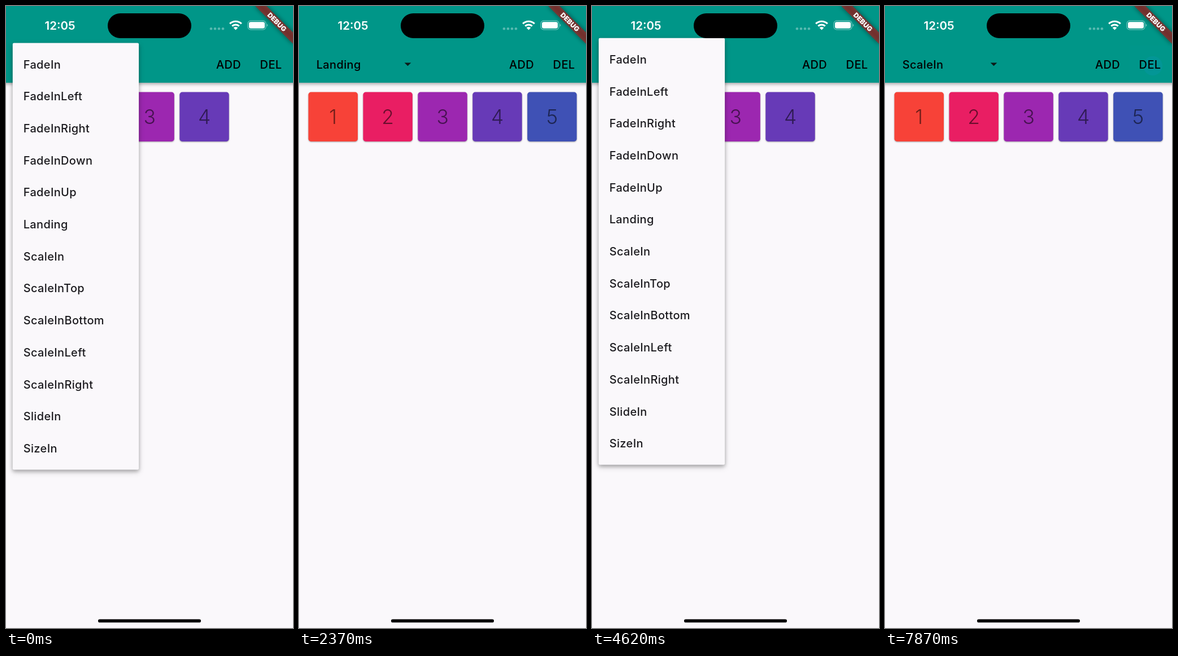
An HTML page for the animation above (8 s loop, 508x1102 px).

```html
<!DOCTYPE html>
<html lang="en">
<head>
<meta charset="utf-8">
<title>List effects</title>
<style>
  html, body { margin: 0; width: 100%; height: 100%; overflow: hidden; background: #faf8fb; }
  svg { display: block; width: 100vw; height: 100vh; }
  text { font-family: Inter, Roboto, sans-serif; }
  .label { font-size: 20px; font-weight: 500; letter-spacing: .35px; }
  .num { font-size: 35.4px; font-weight: 350; text-anchor: middle; fill: rgba(0,0,0,.54); }
  .bar { filter: drop-shadow(0 2px 3px rgba(0,0,0,.38)); }
  .card { filter: drop-shadow(0 1px 1.2px rgba(0,0,0,.35)); }
  .sheet { filter: drop-shadow(0 3px 3px rgba(0,0,0,.2)) drop-shadow(0 3px 5px rgba(0,0,0,.22)); }
  .blur { filter: blur(4px); }
</style>
</head>
<body>
<svg viewBox="0 0 508 1102" preserveAspectRatio="none">
  <defs>
    <clipPath id="slot"><rect x="-48.45" y="-48.45" width="96.9" height="96.9"/></clipPath>
    <clipPath id="picker"><rect x="30.7" y="74.5" width="176.5" height="56.7"/></clipPath>
    <clipPath id="add"><rect x="356.5" y="69.7" width="75.7" height="66.1"/></clipPath>
    <clipPath id="del"><rect x="432.3" y="69.7" width="75.7" height="66.1"/></clipPath>
  </defs>
  <rect width="508" height="1102" fill="#faf8fb"/>
  <g id="cards"></g>
  <rect class="bar" x="-20" y="-20" width="548" height="155.9" fill="#009688"/>
  <g id="ripples"></g>
  <text id="choice" class="label" x="30.7" y="111"></text>
  <path d="M186.6 100.4h11.8l-5.9 5.9z" fill="#0c1a18"/>
  <text class="label" x="372" y="111">ADD</text>
  <text class="label" x="449.6" y="111">DEL</text>
  <g id="menu"></g>

  <g fill="#fff">
    <text x="95.5" y="42.4" font-size="20.5" font-weight="600" text-anchor="middle">12:05</text>
    <g fill-opacity=".35">
      <circle cx="363" cy="40.2" r="2.3"/><circle cx="370" cy="40.2" r="2.3"/>
      <circle cx="377" cy="40.2" r="2.3"/><circle cx="384" cy="40.2" r="2.3"/>
    </g>
    <path d="M406.5 42.5l-3.9-4a5.7 5.7 0 0 1 7.8 0z"/>
    <g fill="none" stroke="#fff" stroke-width="3.1">
      <path d="M400.3 35.6a9 9 0 0 1 12.4 0"/>
      <path d="M396.2 31.4a14.8 14.8 0 0 1 20.6 0"/>
    </g>
    <rect x="428" y="26.2" width="32" height="15.6" rx="5" fill="none" stroke="#fff" stroke-opacity=".45" stroke-width="1.2"/>
    <rect x="430" y="28.2" width="28" height="11.6" rx="3.2"/>
    <path d="M461.8 31.4q3 2.6 0 5.2z" fill-opacity=".5"/>
  </g>
  <rect x="180" y="13" width="148" height="44" rx="22"/>
  <g transform="translate(508 0) rotate(45)">
    <rect class="blur" x="-47.3" y="33.1" width="94.6" height="14.2" fill-opacity=".5"/>
    <rect x="-47.3" y="33.1" width="94.6" height="14.2" fill="#b71c1c" fill-opacity=".627"/>
    <text y="44.5" font-size="12" font-weight="900" text-anchor="middle" fill="#fff">DEBUG</text>
  </g>
  <rect x="163" y="1086.6" width="182" height="5.6" rx="2.8"/>
</svg>
<script>
const LOOP = 8000, STEP = 125;
const ROW = 56.71, PAD = 9.45, SLOT = 96.9;
const colors = ['#f74238', '#e91e63', '#9c27b0', '#673ab7', '#3f51b5'];
const effects = ['FadeIn', 'FadeInLeft', 'FadeInRight', 'FadeInDown', 'FadeInUp', 'Landing',
  'ScaleIn', 'ScaleInTop', 'ScaleInBottom', 'ScaleInLeft', 'ScaleInRight', 'SlideIn', 'SizeIn'];

const $ = id => document.getElementById(id);
const unit = v => Math.max(0, Math.min(1, v));
const ramp = (t, from, span) => unit((t - from) / span);
const mix = (a, b, k) => a + (b - a) * k;

function card(slot, n, scale = 1, alpha = 1) {
  const x = 60.3 + SLOT * slot;
  return `<g transform="translate(${x} 196.3)" clip-path="${scale > 1 ? 'url(#slot)' : 'none'}">
    <g transform="scale(${scale})" opacity="${alpha}">
      <rect class="card" x="-43.7" y="-43.7" width="87.4" height="87.4" rx="4.7" fill="${colors[n - 1]}"/>
      <text class="num" y="13">${n}</text></g></g>`;
}

const row = list => list.map((n, i) => n ? card(i, n) : '').join('');
const landing = k => card(1, 2, mix(1.5, 1, k), k);

function cards(t) {
  if (t < 1625) return row([1, 2, 3, 4]);
  if (t < 2000) return row([1, 0, 3, 4, 5]) + landing(ramp(t, 1625, 300));
  if (t < 3000) return row([1, 2, 3, 4, 5]);
  if (t < 3286) return row([1, 0, 2, 3, 4]) + landing(1 - ramp(t, 2986, 300));
  if (t < 6625) return row([1, 2, 3, 4]);
  if (t < 7000) return row([1, 0, 3, 4, 5]) + card(1, 2, ramp(t, 6600, 300));
  return row([1, 2, 3, 4, 5]);
}

function press(t, start, span, id, x, y) {
  const age = t - start;
  if (age < 0 || age >= span) return '';
  const fade = ramp(span - age, 0, span * .6);
  return `<g clip-path="url(#${id})" fill="#2196f3" opacity="${fade}">
    <rect x="340" y="60" width="168" height="80" opacity="${.02 + .05 * ramp(age, 0, 125)}"/>
    <circle cx="${x}" cy="${y}" r="${17 + age * .26}" opacity=".11"/></g>`;
}

function pickerPress(t) {
  if (t < 4125 || t >= 4500) return '';
  return `<g clip-path="url(#picker)" fill="#c8c8c8">
    <rect x="30" y="74" width="178" height="58" opacity="${.09 * ramp(t, 4080, 170)}"/>
    <circle cx="75" cy="93" r="${(t - 4090) * .388}" opacity=".28"/></g>`;
}

// k is the opening progress, fade the opacity of the whole sheet
function menu(selected, top, k, fade) {
  const grow = ramp(k, .25, .25), part = .5 / (effects.length + 1.5);
  const from = top + PAD + selected * ROW, end = top + 2 * PAD + effects.length * ROW;
  const y = mix(selected ? from - PAD + 9.3 : top, top, grow);
  const bottom = mix(from + ROW, end, grow);
  const items = effects.map((name, i) => {
    const show = i === selected ? 1 : ramp(k, .5 + (i + 1) * part, 1.5 * part);
    return `<text class="label" x="30.7" y="${top + PAD + (i + .5) * ROW + 7.3}" opacity="${show}">${name}</text>`;
  }).join('');
  return `<g opacity="${fade}"><rect class="sheet" x="11.8" y="${y}" width="223.3" height="${bottom - y}" rx="2.4" fill="#faf8fb"/>
    <g fill="#1c1b1f">${items}</g></g>`;
}

function menus(t) {
  if (t < 535) return menu(0, 65.4, 1, 1 - ramp(t, 462, 75));
  if (t >= 4200 && t < 5787) {
    const k = ramp(t, 4200, 300);
    return menu(5, 56.7, k, Math.min(unit(k / .25), 1 - ramp(t, 5712, 75)));
  }
  return '';
}

function draw(t) {
  $('cards').innerHTML = cards(t);
  $('ripples').innerHTML = press(t, 1625, 750, 'add', 388, 97) + press(t, 2875, 750, 'del', 474, 106) +
    press(t, 6625, 625, 'add', 388, 97) + press(t, 7875, 750, 'del', 474, 106) + pickerPress(t);
  $('choice').textContent = t < 500 ? 'FadeIn' : t < 5750 ? 'Landing' : 'ScaleIn';
  $('menu').innerHTML = menus(t);
}

// The screen refreshes eight times a second
const begin = performance.now();
let last = -1;
function tick() {
  const t = (performance.now() - begin) % LOOP;
  const now = Math.floor((t + 5) / STEP) * STEP % LOOP;
  if (now !== last) draw(last = now);
  requestAnimationFrame(tick);
}
tick();
</script>
</body>
</html>
```
